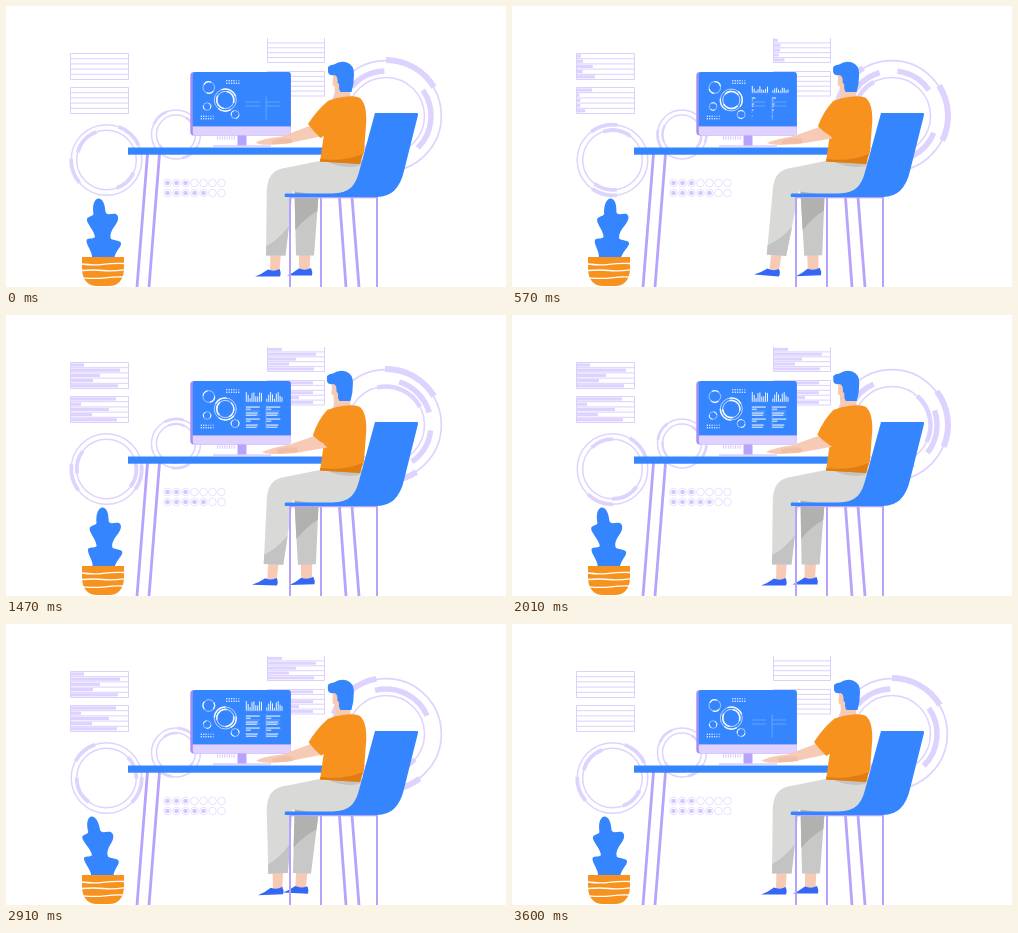
These frames come from a looping animation (500 by 281 pixels, 3.63 s). An HTML page with a canvas:

```html
<!DOCTYPE html>
<html lang="en">
<head>
<meta charset="utf-8">
<title>Working at a desk</title>
<style>
html, body { margin: 0; width: 100%; height: 100%; overflow: hidden; background: #fff; }
canvas { display: block; width: 500px; height: 281px; }
</style>
</head>
<body>
<canvas id="stage"></canvas>
<script>
const W = 500, H = 281, LOOP = 3630, TURN = 3600, STEP = 30;
const BLUE = '#3585ff', ORANGE = '#f8921f', SKIN = '#f6cab5', PALE = '#ded3ff',
      LILAC = '#b7a3fb', SHOE = '#3268f5', GREY = '#d9d9d8', SHADE = '#c3c3c3';
const canvas = document.getElementById('stage');
const ctx = canvas.getContext('2d');
const dpr = window.devicePixelRatio || 1;
canvas.width = Math.round(W * dpr);
canvas.height = Math.round(H * dpr);

const lerp = (a, b, u) => a + (b - a) * u;
const clamp = u => Math.max(0, Math.min(1, u));
const smooth = u => { u = clamp(u); return u * u * (3 - 2 * u); };
const grow = (t, start, span = 1000) => t >= TURN ? 0 : smooth((t - start) / span);

// Periodic cubic through poses at uneven times.
const KEYS = [0, 570, 1080, 1470, 2010, 2910];
function pose(values, t) {
  const n = KEYS.length;
  const time = i => KEYS[(i + n) % n] + TURN * Math.floor(i / n);
  const value = i => values[(i + n) % n];
  t %= TURN;
  let i = n - 1;
  while (KEYS[i] > t) i--;
  const slope = j => (value(j + 1) - value(j - 1)) / (time(j + 1) - time(j - 1));
  const d = time(i + 1) - time(i), u = (t - time(i)) / d, u2 = u * u, u3 = u2 * u;
  return (2 * u3 - 3 * u2 + 1) * value(i) + (u3 - 2 * u2 + u) * d * slope(i) +
         (3 * u2 - 2 * u3) * value(i + 1) + (u3 - u2) * d * slope(i + 1);
}

function shape(d, color) {
  ctx.fillStyle = color;
  ctx.fill(new Path2D(d));
}
function stroke(d, color, width) {
  ctx.strokeStyle = color;
  ctx.lineWidth = width;
  ctx.stroke(new Path2D(d));
}
function rect(x, y, w, h, color) {
  ctx.fillStyle = color;
  ctx.fillRect(x, y, w, h);
}
function arc(x, y, r, from, to, color, width) {
  ctx.beginPath();
  ctx.arc(x, y, r, from * Math.PI / 180, to * Math.PI / 180);
  ctx.strokeStyle = color;
  ctx.lineWidth = width;
  ctx.stroke();
}
function dot(x, y, r, color) {
  ctx.beginPath();
  ctx.arc(x, y, r, 0, 7);
  ctx.fillStyle = color;
  ctx.fill();
}
// Leans everything drawn inside, leaving the row at pivot in place.
function lean(k, pivot, draw) {
  ctx.save();
  ctx.transform(1, 0, k, 1, -k * pivot, 0);
  draw();
  ctx.restore();
}
function swing(angle, x, y, draw) {
  ctx.save();
  ctx.translate(x, y);
  ctx.rotate(angle);
  ctx.translate(-x, -y);
  draw();
  ctx.restore();
}
function sweep(x, y, r, width, spin, arcs, color = PALE) {
  for (const [from, to] of arcs) arc(x, y, r, from + spin, to + spin, color, width);
}
function dial(x, y, r, width, spin, arcs, color = PALE, line = 1.5) {
  arc(x, y, r, 0, 360, color, line);
  sweep(x, y, r, width, spin, arcs, color);
}

function drawDials(spin) {
  dial(100.5, 154, 35.3, 3.8, -spin, [[-70, -25], [140, 182]]);
  dial(100.5, 154, 29.8, 3.8, spin, [[25, 70], [195, 250]]);
  dial(170, 128.5, 24.5, 2.8, -spin, [[-155, -112], [30, 75]]);
  dial(170, 128.5, 19.5, 2.4, spin, [[100, 150], [-60, -15]]);
  arc(380, 110, 55.3, 0, 360, PALE, 1.7);
  sweep(380, 110, 56, 6, spin, [[-90, -31], [122, 182]]);
  sweep(380, 110, 45, 5.5, spin, [[-35, 45], [-140, -92], [140, 197]]);
  dial(380, 110, 38.5, 4.5, spin, [[110, 185]]);
}

// Each row holds the final bar length and its delay.
const PANELS = [
  [64.5, 47.5, [[13, 210], [49, 350], [29, 40], [22, 240], [47, 150]]],
  [64.5, 81.5, [[45, 180], [10, 250], [38, 390], [21, 320], [46, 300]]],
  [261.5, 32, [[14, 220], [48, 340], [28, 270], [21, 260], [46, 260]]],
  [261.5, 65.5, [[45, 200], [10, 250], [45, 350], [31, 280], [45, 300]]]
];
function drawPanels(t) {
  PANELS.forEach(([x, y, rows], p) => {
    const w = p < 2 ? 58 : 57, gap = p < 2 ? 5.2 : 4.9;
    rows.forEach(([length, delay], i) => {
      rect(x + 0.5, y + gap * i + 0.9, length * grow(t, delay), gap - 2, PALE);
    });
    let d = `M${x} ${y}v${gap * 5}M${x + w} ${y}v${gap * 5}`;
    for (let i = p === 2 ? 1 : 0; i < 6; i++) d += `M${x} ${y + gap * i}h${w}`;
    stroke(d, '#d3c5ff', 0.8);
  });
}

function drawCounters() {
  [3, 5].forEach((full, row) => {
    for (let i = 0; i < 7; i++) {
      const x = 161.5 + i * 9, y = 177 + row * 10;
      arc(x, y, 3.8, 0, 360, '#e2d9ff', 0.8);
      if (i < full) dot(x, y, 2.3, '#d3c6ff');
    }
  });
}

function drawDesk() {
  stroke('M141.5 148L131 281M153.5 148L143 281M333 185L340 281M345.5 185L353 281', LILAC, 2.8);
  rect(122, 141.5, 208, 7.2, BLUE);
}

function drawScreen(t, spin) {
  const white = 'rgba(255,255,255,.9)', faint = 'rgba(255,255,255,.5)';
  dial(203, 82, 5.8, 1.3, spin, [[-150, -70], [40, 110]], white, 0.6);
  dial(201.3, 101, 3.8, 1, -spin, [[-60, 30], [120, 190]], white, 0.5);
  dial(219.5, 94.5, 11, 1.4, spin, [[-110, -20], [60, 130]], white, 0.7);
  dial(219.5, 94.5, 8.6, 1.6, -spin, [[-80, 20], [100, 210]], white, 0.8);
  dial(229.3, 109, 4, 1, spin, [[10, 80], [170, 250]], white, 0.6);
  for (let i = 0; i < 6; i++) {
    for (const [x, y, full] of [[221, 75.3, 4], [221, 77.8, 6], [195.5, 110.8, 3], [195.5, 113.3, 5]])
      dot(x + i * 2.4, y, 0.75, i < full ? white : faint);
  }
  stroke('M260.3 91v23', faint, 0.5);
  for (const x of [240, 260.5]) {
    for (const y of [96.5, 100.5]) stroke(`M${x} ${y}h14`, faint, 0.5);
    for (let i = 0; i < 9; i++) {
      const height = 2 + 7.5 * Math.abs(Math.sin(i * 2.3 + x * 0.7));
      rect(x + i * 1.9, 87, 1, -height * grow(t, i % 4 * 60, 900), white);
    }
    if (grow(t, 30) > 0) stroke(`M${x} 87.2h16`, faint, 0.5);
    // Four short paragraphs of two lines each.
    for (let i = 0; i < 4; i++) {
      const y = 92 + i * 6;
      rect(x, y, (14 - i % 2 * 2) * grow(t, 250 + i * 60, 950), 1.1, white);
      rect(x, y + 2.2, (5 + i % 2 * 6) * grow(t, 300 + i * 60, 950), 1, white);
    }
  }
}

function drawMonitor(t, spin) {
  rect(231.5, 128, 9, 12, LILAC);
  rect(207, 139.3, 58, 1.5, '#dacdff');
  for (let i = 0; i < 8; i++) rect(211 + i * 2.4, 130.2, 1, 3.5, '#d5c8ff');
  ctx.save();
  ctx.translate(-0.2, -0.5);
  shape('M188 66.5H282Q285 66.5 285 69.5V127Q285 130 282 130H188Q184.5 130 184.5 126V70Q184.5 66.5 188 66.5Z', '#a58df4');
  shape('M190 66.5H282Q285 66.5 285 69.5V121H187V69.5Q187 66.5 190 66.5Z', BLUE);
  shape('M187 121H285V127Q285 130 282 130H190Q187 130 187 127Z', '#dfd2ff');
  drawScreen(t, spin);
  ctx.restore();
}

function drawPlant(t) {
  const sway = 7.2 * Math.sin(2 * Math.PI * t / TURN);
  lean(-sway / 67, 260, () => shape(
    'M92 192.5C96 192 99 197 99.5 206C101 210 105 207 110 208C114.5 211 111 217 108 221' +
    'C104 227 104 230 105 233C109 235 114 234 115 237C115.5 241 110 244 108 252.5H86' +
    'C87 246 80 239 80.5 234.5C81 231 87 234 89 231C88 224 80 217 81 213' +
    'C82 210 86 211 87.5 208C86.5 202 87 194 92 192.5Z', BLUE));
  shape('M76 251H118V262C118 274 112 280 103 280H91C82 280 76 274 76 262Z', ORANGE);
  stroke('M76 258Q87 259.5 97 258.3T118 257.5M76 264.5Q88 263.5 97 264.5T118 263.8M77 271.8Q89 273 99 271.8T117.5 271', '#fff', 1.3);
}

function drawLegs(t) {
  const near = pose([0, -7, -9, -3, 0, 3], t);
  const far = pose([0, 3, 5, 2.5, -0.5, -4], t);
  swing(-far / 82, 300, 188, () => {
    shape('M293 246H304.5L303.5 264H293Z', SKIN);
    shape('M281 269.5Q287 267 293 262.5Q299 265 305 262Q307 266 306 269.5Z', SHOE);
    shape('M288.5 183H313L308 249.5H290Z', '#c8c8c7');
    shape('M288.5 183H313L311.3 205Q299 212 289.3 224Z', '#b1b1b0');
  });
  swing(-near / 85, 270, 185, () => {
    shape('M264.5 246H275L273.5 265H264Z', SKIN);
    shape('M249 270.5Q256 268 262 263.5Q268 266 273.5 263Q275.5 267 274 270.5Z', SHOE);
    shape('M260.8 183H287L279.5 249.5H260Z', GREY);
    shape('M260.2 240Q271 235 283 220L279.5 249.5H260Z', SHADE);
  });
  shape('M316 154.5L284 161C268 163 262 168 260.8 185H284L320 190H352L358 154Z', GREY);
  shape('M322 156H356L353 160Q338 163 322 156Z', SHADE);
}

const mix = (from, to, u) => from.map((v, i) => lerp(v, to[i], u));
function softArm(p, color) {
  ctx.beginPath();
  ctx.moveTo(p[0], p[1]);
  ctx.lineTo(p[2], p[3]);
  ctx.quadraticCurveTo(p[4], p[5], p[6], p[7]);
  ctx.quadraticCurveTo(p[8], p[9], p[10], p[11]);
  ctx.lineTo(p[12], p[13]);
  ctx.closePath();
  ctx.fillStyle = color;
  ctx.fill();
}

function drawPerson(t) {
  const reach = pose([0, 0.72, 1, 0.87, 0.6, 0.1], t);
  shape('M331 78H343L345 93H328Z', SKIN);
  shape('M331 92Q345 89 353 91.5Q360.5 96 360.3 115L358 146L354 158L314 155.5L318 128L322 95Z', ORANGE);
  shape('M314.3 153Q338 156 356.5 148L354 158L314 155.5Z', '#e07d12');

  softArm(mix([306, 119, 276, 130.5, 258, 132, 249.5, 136.5, 255, 140.5, 281, 137.5, 317, 130],
              [310, 121, 283, 130, 267, 133, 257, 137, 264, 140.5, 291, 138, 322, 133], reach), SKIN);
  const hand = 266 + 6 * reach;
  shape(`M${hand} 134.5Q${hand + 10} 131 ${hand + 20} 133L${hand + 20} 137Q${hand + 8} 138 ${hand} 138Z`, '#f1bea6');
  softArm(mix([331, 92, 322, 95, 311, 104, 302, 118, 307, 125, 314.5, 132, 338, 116],
              [331, 92, 321, 95, 312, 105, 307.5, 121, 313, 126, 321, 130, 338, 116], reach), ORANGE);

  ctx.save();
  ctx.translate(-1.2 * reach, 0);
  shape('M327 66Q327 74 326.5 79Q327 80 328.5 80L329 88Q333 92 338 88L343 72Z', SKIN);
  shape('M322 61Q324 58.5 328 58.5Q334 54.5 341 56.5Q348 59 348 68Q348 78 345.5 86H334.5Q332.5 83 333 78Q331 77 331.5 74Q331.5 70 328.5 69Q323 70 322 66Z', BLUE);
  ctx.restore();
}

function drawChair() {
  stroke('M284 281V191.3H371V281M315 191V281', LILAC, 2);
  shape('M369 107H411Q412.5 107 412 109L398 165Q392 191 371 191H279Q278 187.5 280 187.5H326C344 187 349 180 353 166Z', BLUE);
}

function draw(t) {
  const spin = 360 * t / TURN;
  ctx.setTransform(dpr, 0, 0, dpr, 0, 0);
  rect(0, 0, W, H, '#fff');
  drawDials(spin);
  drawPanels(t);
  drawCounters();
  drawDesk();
  drawMonitor(t, spin);
  drawPlant(t);
  drawLegs(t);
  drawPerson(t);
  drawChair();
}

const begin = performance.now();
function frame() {
  const t = (performance.now() - begin) % LOOP;
  draw(Math.floor(t / STEP) * STEP);
  requestAnimationFrame(frame);
}
frame();
</script>
</body>
</html>
```
